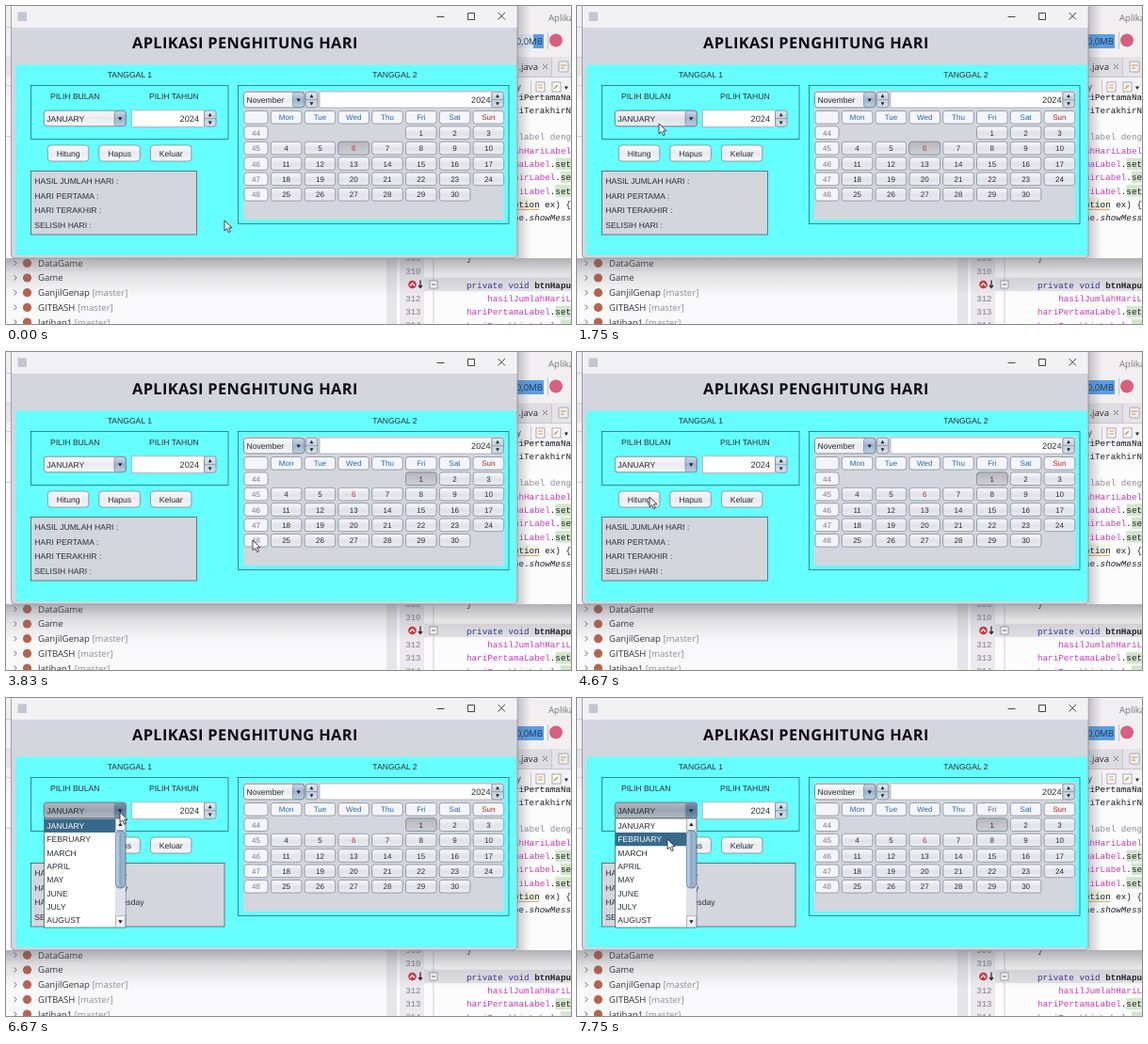
Recreate the animation shown at these times as an HTML page. Size 600 by 338 pixels, loop 8000 ms.

```html
<!DOCTYPE html>
<html lang="id">
<head>
<meta charset="utf-8">
<title>Aplikasi Penghitung Hari</title>
<style>
html, body { margin: 0; width: 100%; height: 100%; overflow: hidden; background: #f9f8fa; }
svg { display: block; width: 600px; height: 338px; }
text { font: 8.6px "Liberation Sans", Arial, sans-serif; fill: #2a2d33; white-space: pre; text-rendering: geometricPrecision; }
.title { font: 700 16.4px "Open Sans", sans-serif; letter-spacing: .35px; fill: #0b0b10; }
.ui { font: 9.6px "Open Sans", sans-serif; }
.code { font: 9.25px "Liberation Mono", monospace; }
.num { font: 9px "Liberation Mono", monospace; fill: #7c7c84; }
.year { font-size: 9.2px; }
.day { font-size: 8px; }
</style>
</head>
<body>
<svg id="stage" viewBox="0 0 600 338" xmlns="http://www.w3.org/2000/svg">
  <defs>
    <linearGradient id="btn" x2="0" y2="1"><stop offset="0" stop-color="#fdfdff"/><stop offset=".5" stop-color="#e9ebf0"/><stop offset="1" stop-color="#f6f7fa"/></linearGradient>
    <linearGradient id="cell" x2="0" y2="1"><stop offset="0" stop-color="#f8f9fb"/><stop offset=".55" stop-color="#dfe2e8"/><stop offset="1" stop-color="#eceef2"/></linearGradient>
    <linearGradient id="down" x2="0" y2="1"><stop offset="0" stop-color="#b4b6bb"/><stop offset="1" stop-color="#cfd0d4"/></linearGradient>
    <linearGradient id="blue" x2="0" y2="1"><stop offset="0" stop-color="#ccd8e5"/><stop offset=".5" stop-color="#9db4cb"/><stop offset="1" stop-color="#bdd0e1"/></linearGradient>
    <linearGradient id="spin" x2="0" y2="1"><stop offset="0" stop-color="#e2e9f1"/><stop offset=".5" stop-color="#c3d0de"/><stop offset="1" stop-color="#d6e0ea"/></linearGradient>
    <linearGradient id="dark" x2="0" y2="1"><stop offset="0" stop-color="#b3b9c3"/><stop offset=".5" stop-color="#9ba3af"/><stop offset="1" stop-color="#b4bac3"/></linearGradient>
    <linearGradient id="navy" x2="0" y2="1"><stop offset="0" stop-color="#7c93aa"/><stop offset=".5" stop-color="#587491"/><stop offset="1" stop-color="#7d96ad"/></linearGradient>
    <linearGradient id="thumb"><stop offset="0" stop-color="#d2e0ec"/><stop offset=".5" stop-color="#86a8c5"/><stop offset="1" stop-color="#a9c3d8"/></linearGradient>
    <linearGradient id="fade" x2="0" y2="1"><stop offset="0" stop-color="#50505a" stop-opacity=".45"/><stop offset=".4" stop-color="#50505a" stop-opacity=".16"/><stop offset="1" stop-color="#50505a" stop-opacity="0"/></linearGradient>
    <linearGradient id="side"><stop offset="0" stop-color="#50505a" stop-opacity=".3"/><stop offset="1" stop-color="#50505a" stop-opacity="0"/></linearGradient>
  </defs>
</svg>
<script>
const NS = 'http://www.w3.org/2000/svg';
const LOOP = 8000, STEP = 1000 / 12;
let layer = document.getElementById('stage');

function el(tag, attrs, text) {
  const node = document.createElementNS(NS, tag);
  for (const k in attrs) node.setAttribute(k, attrs[k]);
  if (text !== undefined) node.textContent = text;
  return layer.appendChild(node);
}
const box = (x, y, w, h, fill, stroke, rx = 0) =>
  el('rect', { x, y, width: w, height: h, fill, rx, stroke: stroke || 'none', 'stroke-width': .8 });
const label = (x, y, s, cls = '', fill = '', anchor = 'start') =>
  el('text', { x, y, class: cls, 'text-anchor': anchor, style: fill && 'fill:' + fill }, s);
const path = (d, stroke, width = 1, fill = 'none') =>
  el('path', { d, stroke, 'stroke-width': width, fill });
const dot = (cx, cy, r, fill) => el('circle', { cx, cy, r, fill });
const tri = (x, y, up, r = 2.2) =>
  path(`M${x - r} ${y + (up ? 1.5 : -1.5)}h${2 * r}L${x} ${y + (up ? -2 : 2)}z`, 'none', 0, '#20242b');
function group(draw) {
  const outer = layer;
  const g = layer = el('g', {});
  draw();
  layer = outer;
  return g;
}
const show = (node, on) => node.setAttribute('visibility', on ? 'inherit' : 'hidden');

// ---- IDE behind the dialog ----
box(0, 0, 600, 338, '#f9f8fa');
box(0, 0, 600, 54, '#f2eff2');
box(0, 54, 600, 21, '#e6e4e8');
box(0, 75, 600, 22, '#f3f1f4');
label(576, 15.5, 'Aplikasi', 'ui', '#77747c');
box(538, 30, 33, 15, '#5b9ee2');
const memIdle = box(538, 30, 22, 15, '#dde7f3');
label(570, 40.5, '60,0MB', 'ui', '#1c3654', 'end');
path('M575.5 28V46', '#c5c1c8');
dot(584, 36.5, 7, '#d8607f');
box(543, 55, 36, 20, '#dddce1');
path('M543 75.5H600M579.5 55V75', '#c7c4cb');
label(565, 68, '.java', 'ui', '#2b2b30', 'end');
path('M570 62l5 5m0-5l-5 5', '#77757c');
box(587, 59, 10, 11, '#f1f0ee', '#8d9aa8', 1);
path('M589 63h6m-6 3h4', '#cf8a4a');
label(542, 89, 'y', 'ui', '#303036');
path('M557.5 79V94M600 96.5H543', '#c7c4cb');
box(563, 81, 9, 10, '#fff', '#8b93a0');
path('M565 84h5m-5 3h5', '#d98a3c');
box(580, 81, 9, 10, '#fff', '#8b93a0');
path('M582 88l4-4', '#d98a3c', 1.4);
tri(595, 87, false, 2);
box(404, 267, 11, 71, '#e6e5e9');
box(416, 97, 184, 241, '#fdfcfd');
box(418, 97, 26, 241, '#eceaef');

const CHAR = 5.55, INDENT = 4 * CHAR, LEFT = 489;
const rowY = i => 99.5 + 14.3 * i;
const MAGENTA = '#c43fb4', BLUE = '#2f3392', INK = '#1d1d22';
function code(row, x, ...parts) {
  for (const [s, fill, style] of parts) {
    const node = label(x, rowY(row), s, 'code', fill);
    if (style) node.style.cssText += style;
    x += s.length * CHAR;
  }
}
function setLine(row, name) {
  const x = LEFT + (name.length + 1) * CHAR;
  box(x, rowY(row) - 9.5, 60, 12.5, '#d3e6cc');
  code(row, LEFT, [name, MAGENTA], ['.setText', INK]);
}
code(0, LEFT, ['String hariPertamaName', INK]);
code(1, LEFT, ['String hariTerakhirName', INK]);
code(3, LEFT, ['// Update label dengan', '#8c8b92']);
code(4, LEFT, ['hasilJumlahHariLabel', MAGENTA]);
setLine(5, 'hariPertamaLabel');
setLine(6, 'hariTerakhirLabel');
setLine(7, 'selisihHariLabel');
box(516, rowY(8) - 9.5, 50, 12.5, '#f1f5e6');
path(`M516 ${rowY(8) + 2.5}h50`, '#e0a35c');
code(8, LEFT - INDENT, ['} catch (Exception ex) {', INK]);
code(9, LEFT, ['JOptionPane.', INK], ['showMessage', INK, 'font-style:italic']);
code(12, LEFT, ['}', INK]);
box(444, rowY(14) - 11, 156, 14.3, '#e4e3e7');
code(14, LEFT, ['private void ', BLUE], ['btnHapus', INK, 'font-weight:700']);
code(15, LEFT + INDENT, ['hasilJumlahHariLabel', MAGENTA]);
setLine(16, 'hariPertamaLabel');
setLine(17, 'hariTerakhirLabel');
for (let n = 309; n < 315; n++)
  if (n !== 311) label(440.5, rowY(n - 297) - .5, n, 'num', '', 'end');
dot(431.5, 296, 4.3, '#d5303a');
path('M429 297.5l2.5-3 2.5 3', '#fff', 1.3);
path('M440 291.5v8m-2-2.5l2 2.5 2-2.5', '#26262b', 1.3);
path('M454 268V292M454 300V338', '#c4c2c8', .8);
box(450, 292, 8, 8, '#fff', '#8f8d95');
path('M452 296h4', '#55555c', .9);

const tree = [['DataGame'], ['Game'], ['GanjilGenap', 1], ['GITBASH', 1], ['latihan1', 1]];
tree.forEach(([name, repo], i) => {
  const y = 273.3 + i * 15.7;
  path(`M8.5 ${y - 2.7}l2.7 2.7-2.7 2.7`, '#6e6c74', 1);
  dot(22.5, y, 4.6, '#b5654f');
  const t = label(34, y + 3.4, name, 'ui', '#36353b');
  if (repo) {
    const s = document.createElementNS(NS, 'tspan');
    s.textContent = ' [master]';
    s.style.fill = '#8f8d95';
    t.appendChild(s);
  }
});
path('M0 22.5H6M0 54.5H6M0 84.5H6M0 138.5H6', '#cfccd3');
box(0, 268, 600, 40, 'url(#fade)');
box(543, 0, 14, 268, 'url(#side)');

// ---- dialog window ----
const GREY = '#d3d6dd', EDGE = '#1f6f78';
box(5.5, -6, 537.5, 274, GREY, '#8d9098', 4);
box(6, 0, 536.6, 23, '#f2f1f4');
box(12.5, 6.5, 9.5, 9.5, '#c3c6d0');
path('M457.5 11.5h8', '#333', .9);
path('M490.5 7.5h7v7h-7z', '#333', .9);
path('M522.5 7l7.5 7.5m0-7.5l-7.5 7.5', '#333', .9);
label(134, 45.1, 'APLIKASI PENGHITUNG HARI', 'title');
box(10, 62.5, 532, 202.5, '#66ffff');
label(131.3, 75.5, 'TANGGAL 1', '', '', 'middle');
label(413, 75.5, 'TANGGAL 2', '', '', 'middle');
box(26.5, 84.5, 209.5, 57, 'none', EDGE);
box(246.5, 84.5, 287.5, 147, 'none', EDGE);
label(47, 98.8, 'PILIH BULAN');
label(152, 98.8, 'PILIH TAHUN');

function combo(x, y, w, h, text, body, arrow) {
  box(x, y, w, h, `url(#${body})`, '#6f7783', 3);
  box(x + w - 12.5, y + .4, 12.1, h - .8, `url(#${arrow})`, '#7d8fa2', 2.5);
  tri(x + w - 6.3, y + h / 2 + .3, false);
  label(x + 3, y + h / 2 + 3.2, text);
}
function spinButtons(x, y, h) {
  box(x, y, 12.5, h, 'url(#spin)', '#7c8591', 2.5);
  path(`M${x} ${y + h / 2}h12.5`, '#8b939e', .8);
  tri(x + 6.2, y + h * .27, true, 1.9);
  tri(x + 6.2, y + h * .75, false, 1.9);
}
const monthCombo = (body, arrow) => combo(40.3, 111.2, 87.2, 16.6, 'JANUARY', body, arrow);
monthCombo('btn', 'blue');
const comboHot = group(() => monthCombo('cell', 'blue'));
const comboOpen = group(() => monthCombo('dark', 'navy'));
box(133.5, 110.8, 77, 17.6, '#fff', '#cf9fa6');
label(205, 122.7, '2024', 'year', '', 'end');
spinButtons(210.5, 111, 17.2);

function button(x, text, fill = 'btn') {
  box(x, 148, 43.5, 17, `url(#${fill})`, '#7d8690', 3.5);
  label(x + 21.8, 159.6, text, '', '', 'middle');
}
button(44.3, 'Hitung');
button(98.8, 'Hapus');
button(153.4, 'Keluar');
const pressed = group(() => button(44.3, 'Hitung', 'down'));
const focusRing = el('rect', { x: 43.7, y: 147.4, width: 44.7, height: 18.2, rx: 4, fill: 'none', stroke: '#46698c', 'stroke-width': 1.4 });

const panel = box(26.5, 175.5, 176, 67.5, GREY, '#4b5f66');
const results = [['HASIL JUMLAH HARI', 31], ['HARI PERTAMA', 'Monday'], ['HARI TERAKHIR', 'Wednesday'], ['SELISIH HARI', 305]]
  .map(([name, value], i) => ({ name, value, node: label(30.3, 188.8 + i * 15.8, '') }));

// ---- calendar ----
box(252, 89.5, 277, 137.5, GREY);
combo(252.5, 91.3, 64.5, 16.6, 'November', 'btn', 'blue');
spinButtons(318.3, 91.3, 16.6);
box(333, 91, 183, 17, '#fff', '#a5abb4');
label(514.5, 103, '2024', 'year', '', 'end');
spinButtons(515.8, 91.3, 16.6);

const colX = c => 281.3 + 35.8 * c, cellY = r => 111.5 + 16.4 * r;
function cell(x, y, w, text, color, fill = 'url(#cell)') {
  box(x, y, w, 13.6, fill, '#858d98', 2.8);
  label(x + w / 2, y + 9.8, text, 'day', color, 'middle');
}
const HEAD = '#f3f5fa', RED = '#b8323c';
cell(253, cellY(0), 25, '', '', HEAD);
['Mon', 'Tue', 'Wed', 'Thu', 'Fri', 'Sat', 'Sun'].forEach((d, c) =>
  cell(colX(c), cellY(0), 32.6, d, c < 6 ? '#2468ac' : '#b02a22', HEAD));
for (let r = 1; r < 6; r++) cell(253, cellY(r), 25, 43 + r, '#747b85', HEAD);
function day(n, fill) {
  const i = n + 3;
  cell(colX(i % 7), cellY(1 + Math.floor(i / 7)), 32.6, n, n === 6 ? RED : '', fill);
}
for (let n = 1; n <= 30; n++) day(n);
const day6 = group(() => day(6, 'url(#down)'));
const day1 = group(() => day(1, 'url(#down)'));

// ---- month list ----
const months = ['JANUARY', 'FEBRUARY', 'MARCH', 'APRIL', 'MAY', 'JUNE', 'JULY', 'AUGUST'];
const ITEM = 14.35;
let highlight, names, thumbHot;
const popup = group(() => {
  box(40.5, 128, 86.5, 116, '#fff', '#525b66');
  highlight = box(41, 128.6, 75, ITEM, '#39698a');
  names = months.map((m, i) => label(43.3, 138.9 + i * ITEM, m));
  box(116, 128.5, 10.7, 115, '#dfe2e8');
  box(116.4, 128.5, 10, 12, 'url(#btn)', '#a2a8b1');
  box(116.4, 231.7, 10, 12, 'url(#btn)', '#a2a8b1');
  tri(121.4, 134.5, true);
  tri(121.4, 237.8, false);
  box(116.6, 141, 9.7, 61, 'url(#thumb)', '#5a7691', 4);
  thumbHot = box(116.6, 141, 9.7, 61, '#dcebf6', '#5a7691', 4);
  thumbHot.setAttribute('fill-opacity', .55);
});

const cursor = el('path', {
  d: 'M0 0V10.8L2.6 8.4 4.5 12.6 6.3 11.8 4.5 7.8H8z',
  fill: '#fff', stroke: '#1a1a1e', 'stroke-width': .8, 'stroke-linejoin': 'round'
});

// time, x, y
const route = [
  [80, 232, 228], [1000, 214, 226], [1660, 88, 127], [1750, 87, 125], [1830, 89, 125],
  [2250, 232, 138], [3080, 426, 138], [3330, 426, 138], [3420, 412, 148], [3720, 412, 148],
  [3830, 262, 200], [4080, 262, 200], [4670, 77, 154], [4830, 74, 157], [5750, 74, 157],
  [6500, 121, 121.5], [6830, 121, 121.5], [7250, 104, 148], [7660, 117, 151], [7740, 96, 150]
];
function place(t) {
  const j = route.findIndex(p => p[0] > t);
  if (j === 0) return route[0].slice(1);
  if (j < 0) return route[route.length - 1].slice(1);
  const [t0, x0, y0] = route[j - 1], [t1, x1, y1] = route[j];
  const u = (t - t0) / (t1 - t0), e = u * u * (3 - 2 * u);
  return [x0 + (x1 - x0) * e, y0 + (y1 - y0) * e];
}

function render(time) {
  // the screen refreshes twelve times a second
  const t = Math.floor((time % LOOP + 5) / STEP) * STEP;
  const [x, y] = place(t);
  cursor.setAttribute('transform', `translate(${x.toFixed(2)} ${y.toFixed(2)})`);
  const open = t >= 6580, done = t >= 5160, picked = t >= 3240;
  show(memIdle, t < 500);
  show(comboHot, !open && x > 40 && x < 128 && y > 111 && y < 128);
  show(comboOpen, open);
  show(day6, !picked);
  show(day1, picked);
  show(pressed, t >= 4990 && !done);
  show(focusRing, done);
  panel.setAttribute('width', done ? 205.5 : 176);
  for (const r of results) r.node.textContent = done ? `${r.name}: ${r.value}` : `${r.name} :`;
  show(popup, open);
  show(thumbHot, x >= 116 && y >= 141);
  const row = t >= 7150 ? 1 : 0;
  highlight.setAttribute('y', 128.6 + row * ITEM);
  names.forEach((n, i) => { n.style.fill = i === row ? '#fff' : ''; });
}

const start = performance.now();
function tick() {
  render(performance.now() - start);
  requestAnimationFrame(tick);
}
tick();
</script>
</body>
</html>
```
